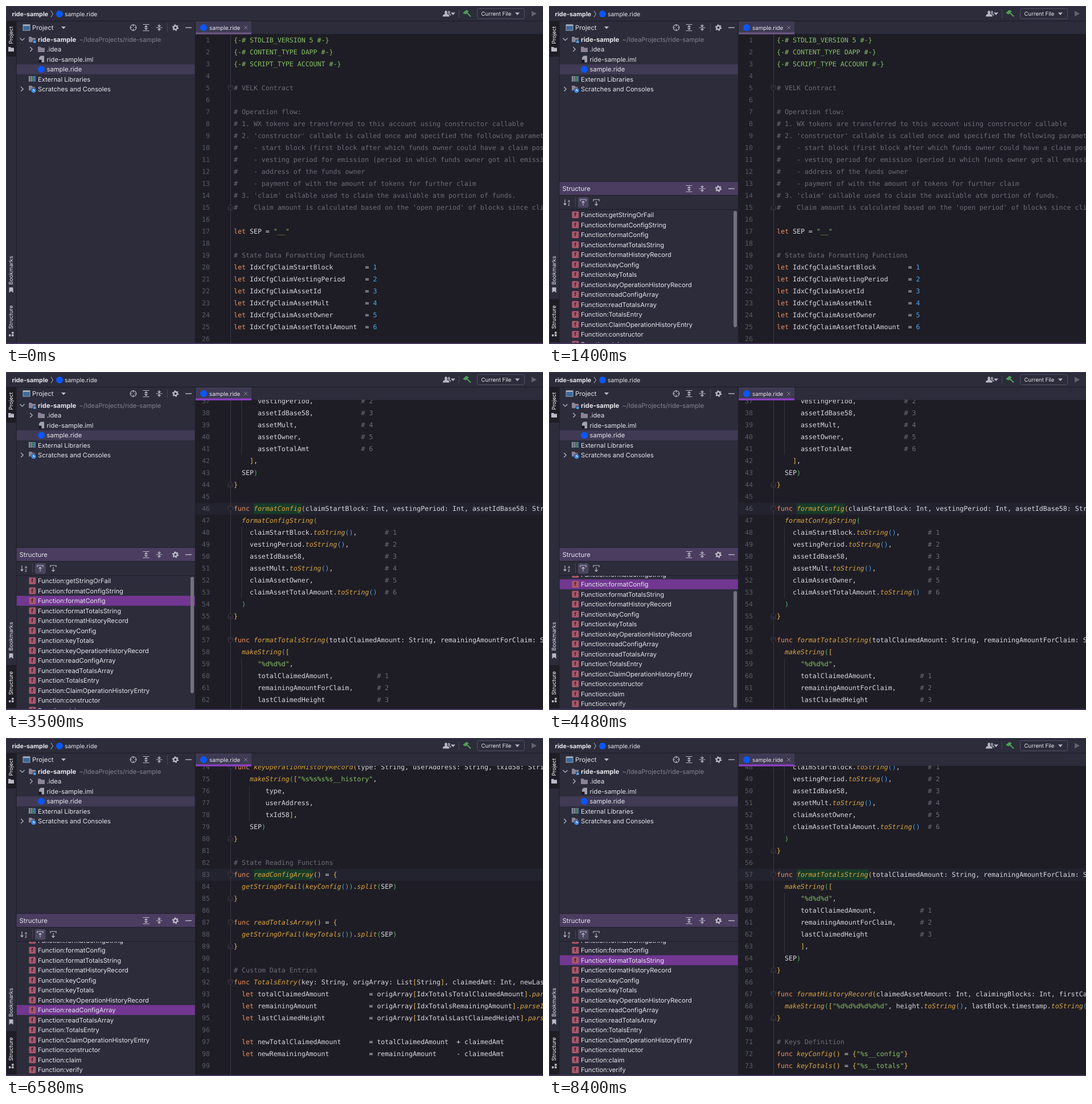
Animation of 943 by 594 pixels, one loop 9.66 s. Source, as an HTML page:

```html
<!DOCTYPE html>
<html lang="en">
<head>
<meta charset="utf-8">
<title>Structure view</title>
<style>
  html, body { margin: 0; width: 100%; height: 100%; overflow: hidden; background: #2c2c3b; }
  svg { display: block; }
  #stage { width: 100%; height: 100%; }
  text { white-space: pre; text-rendering: geometricPrecision; }
  .ui { font-family: Inter, "Open Sans", sans-serif; fill: #e6e6ec; }
  .code { font: 11.6px "DejaVu Sans Mono", "Noto Sans Mono", monospace; fill: #d9d9e1; }
  .icon { fill: none; stroke: #b9bac5; stroke-width: 1.2; }
</style>
</head>
<body>
<svg id="stage" viewBox="0 0 943 594" preserveAspectRatio="none"></svg>
<script>
const LOOP = 9660, CW = 6.983, CODE_X = 400, LINE_H = 21, ROW_H = 17.5;
const LEFT = 18.7, RIGHT = 331.8, WIDE = RIGHT - LEFT;
const C = {
  panel: '#2c2c3b', editor: '#1e1d25', edge: '#1d1c25', dim: '#403a54', focus: '#713791',
  head: '#4a3d60', blue: '#0a56fb', text: '#d9d9e1', grey: '#b9bac5', note: '#6c6c77',
  word: '#f0905f', call: '#d9a441', str: '#86c065', num: '#4aa5ec', curly: '#e8b84c', rule: '#464657'
};
const ROUND = ['#e8b84c', '#5cb56a', '#4a9df0'];
const stage = document.getElementById('stage');

function el(tag, attrs, parent = stage, text) {
  const e = document.createElementNS('http://www.w3.org/2000/svg', tag);
  for (const k in attrs) e.setAttribute(k, attrs[k]);
  if (text !== undefined) e.textContent = text;
  parent.appendChild(e);
  return e;
}
const rect = (x, y, width, height, fill, p, more) => el('rect', { x, y, width, height, fill, ...more }, p);
const path = (d, p, more) => el('path', { d, class: 'icon', ...more }, p);
const solid = (d, fill, p) => el('path', { d, fill }, p);
const label = (s, x, y, size, p, more) => el('text', { x, y, class: 'ui', 'font-size': size, ...more }, p, s);
const group = p => el('g', {}, p);
const view = (x, y, width, height, p) =>
  el('svg', { x, y, width, height, viewBox: `${x} ${y} ${width} ${height}` }, p);
const dot = (cx, cy, r = 6) => el('circle', { cx, cy, r, fill: C.blue });
const down = (x, y, p) => solid(`M${x - 4} ${y - 2}h8l-4 4.6z`, C.grey, p);
const show = (e, on) => e.setAttribute('visibility', on ? 'visible' : 'hidden');

// ---- editor text; "@n" jumps to column n
const HEAD = `{-# STDLIB_VERSION 5 #-}
{-# CONTENT_TYPE DAPP #-}
{-# SCRIPT_TYPE ACCOUNT #-}

# VELK Contract

# Operation flow:
# 1. WX tokens are transferred to this account using constructor callable
# 2. 'constructor' callable is called once and specified the following parameters:
#    - start block (first block after which funds owner could have a claim possibility)
#    - vesting period for emission (period in which funds owner got all emission)
#    - address of the funds owner
#    - payment of with the amount of tokens for further claim
# 3. 'claim' callable used to claim the available atm portion of funds.
#    Claim amount is calculated based on the 'open period' of blocks since client

let SEP = "__"

# State Data Formatting Functions
let IdxCfgClaimStartBlock@33= 1
let IdxCfgClaimVestingPeriod@33= 2
let IdxCfgClaimAssetId@33= 3
let IdxCfgClaimAssetMult@33= 4
let IdxCfgClaimAssetOwner@33= 5
let IdxCfgClaimAssetTotalAmount@33= 6
`;
const BODY = `      vestingPeriod,@32# 2
      assetIdBase58,@32# 3
      assetMult,@32# 4
      assetOwner,@32# 5
      assetTotalAmt@32# 6
    ],
  SEP)
}

func formatConfig(claimStartBlock: Int, vestingPeriod: Int, assetIdBase58: String) = {
  formatConfigString(
    claimStartBlock.toString(),@38# 1
    vestingPeriod.toString(),@38# 2
    assetIdBase58,@38# 3
    assetMult.toString(),@38# 4
    claimAssetOwner,@38# 5
    claimAssetTotalAmount.toString()@38# 6
  )
}

func formatTotalsString(totalClaimedAmount: String, remainingAmountForClaim: String) = {
  makeString([
      "%d%d%d",
      totalClaimedAmount,@36# 1
      remainingAmountForClaim,@36# 2
      lastClaimedHeight@36# 3
      ],
  SEP)
}

func formatHistoryRecord(claimedAssetAmount: Int, claimingBlocks: Int, firstCall: Int) = {
  makeString(["%d%d%d%d%d%d", height.toString(), lastBlock.timestamp.toString()], SEP)
}

# Keys Definition
func keyConfig() = {"%s__config"}
func keyTotals() = {"%s__totals"}
func keyOperationHistoryRecord(type: String, userAddress: String, txId58: String) = {
    makeString(["%s%s%s%s__history",
        type,
        userAddress,
        txId58],
    SEP)
}

# State Reading Functions
func readConfigArray() = {
  getStringOrFail(keyConfig()).split(SEP)
}

func readTotalsArray() = {
  getStringOrFail(keyTotals()).split(SEP)
}

# Custom Data Entries
func TotalsEntry(key: String, origArray: List[String], claimedAmt: Int, newLast: Int) = {
  let totalClaimedAmount@34= origArray[IdxTotalsTotalClaimedAmount].parseInt()
  let remainingAmount@34= origArray[IdxTotalsRemainingAmount].parseInt()
  let lastClaimedHeight@34= origArray[IdxTotalsLastClaimedHeight].parseInt()

  let newTotalClaimedAmount@34= totalClaimedAmount@56+ claimedAmt
  let newRemainingAmount@34= remainingAmount@56- claimedAmt
`;
const TOKEN = /\{-#.*|#.*|"[^"]*"|\w+(?=\()|\w+|[()[\]{}]|[^\s\w()[\]{}"]+/g;
let depth = 0;

function colour(tok) {
  if (tok.startsWith('{-#') || tok[0] === '"') return C.str;
  if (tok[0] === '#') return C.note;
  if (tok === 'let' || tok === 'func') return C.word;
  if (/^\d+$/.test(tok)) return C.num;
  if (tok === '(') return ROUND[Math.min(depth++, 2)];
  if (tok === ')') return ROUND[Math.min(--depth, 2)];
  if (tok === '{') depth++;
  if (tok === '}') depth--;
  return /^[[\]{}]$/.test(tok) ? C.curly : C.text;
}

function foldMark(y, up, p) {
  const s = up ? -1 : 1;
  el('path', { d: `M390 ${y - 4 * s}h8v${5 * s}l-4 ${4 * s}l-4 ${-4 * s}zM392 ${y - s}h4`,
    fill: C.editor, stroke: '#403f4a' }, p);
}

function addLine(src, n, p) {
  const line = src.split('@').reduce((s, part) => {
    const [, col, rest] = part.match(/^(\d+)(.*)/);
    return s.padEnd(+col) + rest;
  });
  const y = 60 + LINE_H * (n - 1);
  el('text', { x: 358, y: y + 4.3, class: 'code', 'text-anchor': 'end', style: 'fill:#595a66' }, p, n);
  const row = el('text', { y: y + 4.3, class: 'code' }, p);
  for (const m of line.matchAll(TOKEN)) {
    const call = /\w/.test(m[0][0]) && line[m.index + m[0].length] === '(';
    el('tspan', {
      x: CODE_X + m.index * CW,
      style: `fill:${call ? C.call : colour(m[0])}` + (call ? ';font-style:italic' : '')
    }, row, m[0]);
  }
  const opens = n === 5 || /^func.*\{$/.test(line);
  if (opens || n === 15 || line === '}') foldMark(y, !opens, p);
}

// ---- editor
rect(0, 0, 943, 594, C.panel);
rect(332.6, 49, 611, 545, C.editor);
const editor = view(333, 49, 610, 543);
const caretRow = group(editor);
rect(333, 229.6, 610, 21, '#23232f', caretRow);
el('path', { d: 'M394.5 49V592', stroke: '#3a3a45' }, editor);
const nameMark = rect(CODE_X + 5 * CW, 231, 0, 18.5, '#173c29', caretRow);
const code = group(editor);
for (const [a, b, col] of [[37, 41, 2], [48, 53, 2], [59, 63, 2], [76, 78, 4]])
  rect(Math.round(CODE_X + col * CW) - 1, 50 + LINE_H * (a - 1), 1, LINE_H * (b - a + 1), '#33333e', code);
HEAD.split('\n').forEach((s, i) => addLine(s, i + 1, code));
depth = 2;
BODY.split('\n').forEach((s, i) => addLine(s, i + 37, code));

// ---- tab bar
rect(333, 27, 610, 22, C.panel);
rect(333, 27, 98, 22, '#3f3a53');
const underline = rect(333, 46.4, 98, 3.4, '#6a567f');
dot(347, 38);
label('sample.ride', 357, 41.5, 9.85);
path('M418 35l6 6m0-6l-6 6', stage, { style: 'stroke:#84848f;stroke-width:1' });

// ---- top bar
rect(0, 26, 943, 0.9, C.edge);
label('ride-sample', 10.5, 17.6, 10.75, stage, { 'font-weight': 700 });
path('M79 8.5l3.5 5.5l-3.5 5.5', stage, { style: 'stroke-width:1' });
dot(94, 14);
label('sample.ride', 103, 17.6, 10.4);
solid('M767 18.5c0-3.5 2-4 4-4.6c-3-7.5 6-7.5 3.4 0c2 .6 4.2 1.1 4.2 4.6z', C.grey);
solid('M776 9c4-2 5 2 3 4.5c2 .5 3 1 3 3h-3c-.5-2-1.5-2.5-3-3z', '#8e8f9b');
down(785, 13.5);
rect(795, 6, 1, 15, C.rule);
el('path', { d: 'M804 12l4.5-4l2.5 1.5l-4 4zM808 10.5l8 8', stroke: '#4f9f56', 'stroke-width': 2.2, fill: '#4f9f56' });
rect(827.5, 4.5, 83, 18, 'none', stage, { rx: 3, stroke: '#525265' });
label('Current File', 834.5, 16.8, 9.6);
down(898, 13.5);
solid('M923 8.5l9 5l-9 5z', '#62626f');

// ---- side strip
rect(17.8, 27, 0.9, 565, C.edge);
rect(1, 27, 16.8, 62, C.editor);
const strip = rect(1, 515, 16.8, 76, C.editor);
const vertical = (s, y, size) => label(s, 0, 0, size, stage, { transform: `translate(12.3 ${y}) rotate(-90)` });
vertical('Project', 66.5, 9.3).style.fill = '#fff';
vertical('Bookmarks', 490, 9.6);
const stripName = vertical('Structure', 567.5, 9.5);
solid('M4 72h4l1 1.5h5v6.5h-10z', C.grey);
solid('M5.5 494.5h7v9.5l-3.5-3l-3.5 3z', C.grey);
for (const [x, y] of [[5, 577], [10, 572.5], [10, 577]]) rect(x, y, 3.5, 3.5, C.grey);

// ---- tool window headers
function gear(x, y, p) {
  el('circle', { cx: x, cy: y, r: 3.2, class: 'icon', style: 'stroke-width:2.4' }, p);
  el('circle', { cx: x, cy: y, r: 4.9, class: 'icon', 'stroke-dasharray': '2.2 2.931', style: 'stroke-width:1.8' }, p);
}
function headIcons(y, p) {
  path(`M240.5 ${y - 5.5}h11m-11 11h11M246 ${y - 3.5}v7m-2.5-4.5l2.5-2.5l2.5 2.5m-5 2l2.5 2.5l2.5-2.5`, p);
  path(`M263.5 ${y}h11M269 ${y - 6}v4m-2.5-2l2.5 2.5l2.5-2.5M269 ${y + 6}v-4m-2.5 2l2.5-2.5l2.5 2.5`, p);
  rect(283, y - 8, 1, 16, C.rule, p);
  gear(297.5, y, p);
  rect(315, y - 0.7, 11, 1.4, C.grey, p);
}
rect(30, 33, 12, 10, '#3c6a99', stage, { stroke: '#9aa4b2' });
rect(30, 32.5, 12, 2.5, '#aab0bd');
label('Project', 46, 42, 11.3);
down(101, 38);
el('circle', { cx: 223.5, cy: 38, r: 5.2, class: 'icon' });
path('M223.5 32v4m0 4v4M217.5 38h4m4 0h4');
headIcons(38, stage);

// ---- project tree
const treeSel = rect(LEFT, 102.5, WIDE, ROW_H, C.dim);
const folder = (x, y) => solid(`M${x - 6} ${y - 5}h4.5l1.5 2h6v7.5h-12z`, '#8a8496');
const right = (x, y) => path(`M${x - 1.8} ${y - 4}l4 4l-4 4`);
path('M24.5 56.5l4 4l4-4');
folder(46, 59);
rect(47.5, 60, 5.5, 5.5, '#4b9be8', stage, { stroke: C.panel });
label('ride-sample', 56, 63, 11.35, stage, { 'font-weight': 700 });
label('~/IdeaProjects/ride-sample', 128.5, 63, 11.1, stage, { style: 'fill:#84848f' });
right(44, 76);
folder(62, 76.5);
label('.idea', 71.5, 80, 11.2);
solid('M61 87.5h6v11.5h-9v-8.5z', '#a2a3ae');
rect(57.5, 94.5, 5, 5, '#15151b');
label('ride-sample.iml', 71.5, 97.6, 11.2);
dot(62, 111.3);
label('sample.ride', 71.5, 115.2, 11.2);
['#9aa0ac', '#9aa0ac', '#62a667', '#4b9be8'].forEach((c, i) => rect(40 + i * 3.2, 123, 2, 10, c));
label('External Libraries', 56, 132.6, 11.2);
right(28, 146);
solid('M40 140h5l1.5 2h4v6.5h-10.5z', '#8a8496');
el('circle', { cx: 48.5, cy: 148.5, r: 4.6, fill: '#3f8df0', stroke: C.panel });
path('M48.5 146v2.7h2', stage, { style: 'stroke:#fff;stroke-width:1' });
label('Scratches and Consoles', 56, 150.2, 11.15);
rect(RIGHT, 27, 0.9, 565, C.edge);

// ---- structure tool window
const panel = group();
rect(LEFT, 308, WIDE, 284, C.panel, panel);
rect(LEFT, 308, WIDE, 0.9, C.edge, panel);
rect(LEFT, 308.9, WIDE, 23.4, C.head, panel);
label('Structure', 23.5, 325, 11.3, panel);
headIcons(321, panel);
rect(LEFT, 332.3, WIDE, 0.9, C.edge, panel);
path('M28 340v9.5m-2.3-2.5l2.3 2.5l2.3-2.5', panel);
label('a', 33, 344.5, 7, panel);
label('z', 33, 350.5, 7, panel);
rect(46, 337, 1, 16, C.rule, panel);
rect(51, 336, 18.5, 18.5, '#4b4560', panel, { rx: 3 });
path('M55 343v-3h10v3M60 350.5v-7m-2.5 2l2.5-2.5l2.5 2.5', panel);
path('M78 343v-3h10v3M83 343v7m-2.5-2l2.5 2.5l2.5-2.5', panel);
rect(LEFT, 357, WIDE, 0.9, C.edge, panel);
const list = view(18, 358, 314, 234, panel);
const rows = group(list);
const rowSel = rect(LEFT, 358, WIDE, ROW_H, C.focus, rows);
const NAMES = ('getStringOrFail formatConfigString formatConfig formatTotalsString formatHistoryRecord ' +
  'keyConfig keyTotals keyOperationHistoryRecord readConfigArray readTotalsArray TotalsEntry ' +
  'ClaimOperationHistoryEntry constructor claim verify').split(' ');
NAMES.forEach((name, i) => {
  const y = 367 + ROW_H * i;
  rect(40.3, y - 6, 12, 12, '#a8576b', rows, { rx: 1.5 });
  label('f', 46.2, y + 3.4, 9.5, rows, { 'text-anchor': 'middle', style: 'fill:#2a1c25', 'font-weight': 600 });
  label('Function:' + name, 56, y + 4, 11.2, rows);
});
const bar = rect(324, 360, 6, 204.5, '#73717d', list, { rx: 3 });

// ---- window edge, tooltip, pointer
rect(0, 0, 943, 1, '#453a59');
rect(0, 0, 1, 594, '#3b344c');
rect(0, 592, 943, 2, '#43365a');
const tip = group();
rect(17.5, 575.5, 91, 24, '#3a384b', tip, { stroke: '#55506a' });
label('Structure', 25, 589.5, 10.5, tip);
el('text', { x: 78, y: 589.5, 'font-size': 10.5, fill: '#9a9aa6', 'font-family': '"DejaVu Sans", sans-serif' }, tip, '\u23187');
const pointer = el('path', {
  d: 'M.5.5V13l2.9-2.7l2 4.9l2.3-1l-2-4.7h4z', fill: '#111', stroke: '#fff', 'stroke-width': 1
});

// ---- timeline: [start, value]
const SELECT = [[0, -1], [2730, 2], [5110, 8], [7840, 3]];
const JUMP = [[0, 0], [2870, 46], [5250, 83], [7980, 57]];
const SCROLL = [[0, 0], [3990, 15], [4060, 29]];
const BAR = [[0, 0], [1400, 1], [6300, 0.5], [6370, 0]];
const POINT = [[3150, 3500, 140, 402], [4200, 4480, 177, 444], [5600, 6580, 142, 478], [8190, 8400, 126, 389]];
const at = (track, t) => track.filter(k => k[0] <= t).pop()[1];

function render(t) {
  const sel = at(SELECT, t), line = at(JUMP, t), scroll = at(SCROLL, t);
  show(strip, t >= 490);
  stripName.style.fill = t >= 490 ? '#fff' : '';
  show(tip, t >= 1050 && t < 1260);
  show(panel, t >= 1330);
  treeSel.setAttribute('fill', t >= 1260 && t < 1330 ? C.focus : C.dim);
  rowSel.setAttribute('y', 358.3 + ROW_H * sel);
  rowSel.setAttribute('opacity', sel < 0 ? 0 : 1);
  rows.setAttribute('transform', `translate(0 ${-scroll})`);
  bar.setAttribute('y', 360 + scroll * 25 / 29);
  bar.setAttribute('opacity', at(BAR, t));

  show(caretRow, line > 0);
  code.setAttribute('transform', `translate(0 ${line ? 180 - LINE_H * (line - 1) : 0})`);
  const name = { 46: 'formatConfig', 83: 'readConfigArray', 57: 'formatTotalsString' }[line] || '';
  nameMark.setAttribute('width', name.length * CW);
  underline.setAttribute('fill', line ? '#8d3fc4' : '#6a567f');

  const p = POINT.find(k => t >= k[0] && t < k[1]);
  show(pointer, p);
  if (p) pointer.setAttribute('transform', `translate(${p[2]} ${p[3]})`);
}

const start = performance.now();
function frame() {
  render((performance.now() - start) % LOOP);
  requestAnimationFrame(frame);
}
render(0);
frame();
</script>
</body>
</html>
```
